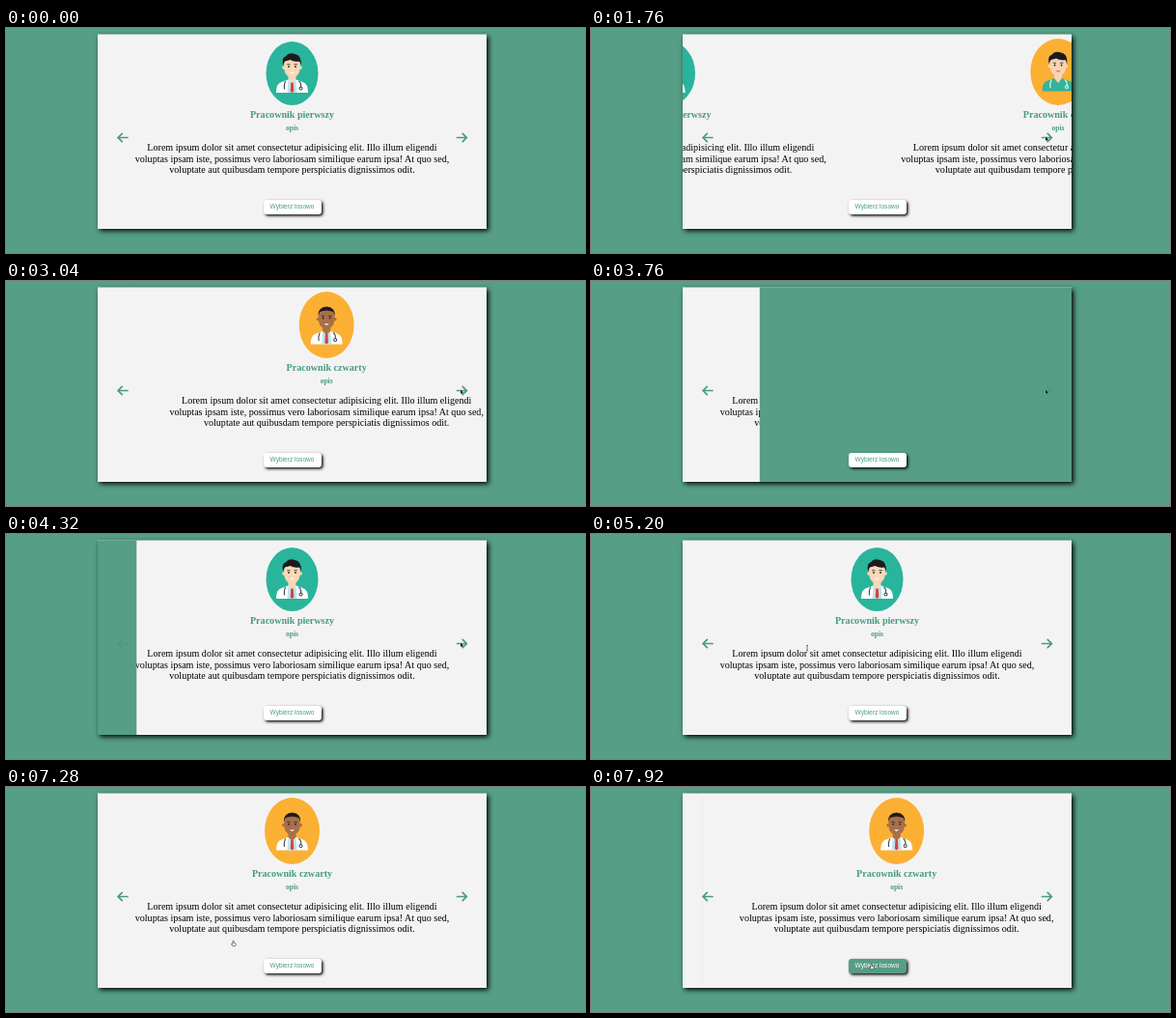
Animation of 600 by 233 pixels, one loop 8000 ms. Source, as an HTML page:

```html
<!DOCTYPE html>
<html lang="pl">
<head>
<meta charset="utf-8">
<title>Slider</title>
<style>
  html, body { margin: 0; width: 100%; height: 100%; overflow: hidden; background: #569e86; }
  svg { display: block; width: 600px; height: 233px; }
  .card, .button { position: absolute; box-sizing: border-box; }
  .card { left: 95px; top: 6.5px; width: 403px; height: 201.5px; box-shadow: 2px 2px 5px #000; }
  svg { position: absolute; left: 0; top: 0; }
  text { text-anchor: middle; font-family: "Liberation Serif", "Times New Roman", serif; }
  .title { font-size: 10.08px; font-weight: bold; fill: #489b7f; }
  .role { font-size: 7.5px; font-weight: bold; fill: #489b7f; }
  .body { font-size: 10.08px; fill: #000; }
  .arrow { fill: none; stroke: #489b7f; stroke-width: 1.7; stroke-linecap: round; stroke-linejoin: round; }
  .button {
    left: 266.5px; top: 178px; width: 60px; height: 14.5px; border-radius: 3px;
    background: #fff; color: #489b7f; box-shadow: 1.5px 1.5px 3px #000;
    font: 6.57px/14.5px "Liberation Sans", Arial, sans-serif; text-align: center; white-space: nowrap;
  }
  .button.hover { background: #569e86; color: #fff; }
</style>
</head>
<body>
<div class="card"></div>
<svg viewBox="0 0 600 233">
  <defs>
    <clipPath id="view"><rect x="95" y="6.5" width="403" height="201.5"/></clipPath>
  </defs>
  <g clip-path="url(#view)">
    <g id="strip"></g>
    <rect id="curtain" y="6" width="403" height="203" fill="#569e86"/>
  </g>
  <path class="arrow" d="M126 113.5H116M120.3 109.3L116 113.5L120.3 117.7"/>
  <path class="arrow" d="M467.5 113.5H477.5M473.2 109.3L477.5 113.5L473.2 117.7"/>
</svg>
<div class="button">Wybierz losowo</div>
<svg viewBox="0 0 600 233">
  <g id="cursor">
    <path id="pointer" d="M0 0V4.6L1.2 3.6L2 5.2L2.8 4.8L2 3.3L3.4 3.2Z" fill="#000" stroke="#ddd" stroke-width=".3"/>
    <path id="beam" d="M-1 -2.6H1M0 -2.6V2.6M-1 2.6H1" fill="none" stroke="#444" stroke-width=".7"/>
    <path id="hand" d="M-1 -2.4Q-.3 -3 .2 -2.3V-.6L2 0Q2.5 .3 2.2 1.6L1.6 2.8H-1L-2.4 .7L-1 .8Z" fill="#fff" stroke="#222" stroke-width=".6"/>
  </g>
</svg>
<script>
const LOOP = 8000, LEFT = 95, WIDTH = 403, MID = 296.5;
const $ = s => document.querySelector(s);

const people = [
  { name: 'pierwszy', back: '#29b59b', rx: 27, ry: 33, cy: 47, skin: '#fbd7b8', coat: '#fff', dy: 1.5, hair: 'quiff' },
  { name: 'drugi', back: '#fbb034', rx: 28.7, ry: 34.5, cy: 45.5, skin: '#f9d3b4', coat: '#35b39a', dy: 0, hair: 'quiff' },
  { name: 'trzeci', back: '#29b59b', rx: 27, ry: 33, cy: 47, skin: '#f9d3b4', coat: '#fff', dy: 1.5, hair: 'short' },
  { name: 'czwarty', back: '#fbb034', rx: 28.5, ry: 34.5, cy: 45.5, skin: '#a87048', coat: '#fff', dy: 0, hair: 'short' }
];
const lines = [
  'Lorem ipsum dolor sit amet consectetur adipisicing elit. Illo illum eligendi',
  'voluptas ipsam iste, possimus vero laboriosam similique earum ipsa! At quo sed,',
  'voluptate aut quibusdam tempore perspiciatis dignissimos odit.'
];
const hairs = {
  quiff: 'M-9.5 37Q-11 29 -7 28Q-3 23 3 25.5Q9.500 26 9.500 37L7.500 33Q2 34 -2 31.500L-7.500 33Z',
  short: 'M-8.700 36Q-9 27 0 26.500Q9 27 8.700 36L7 32Q0 29 -7 32Z'
};

const path = (d, fill, extra = '') => `<path d="${d}" fill="${fill}" ${extra}/>`;
const label = (cls, y, s) => `<text class="${cls}" x="${MID}" y="${y}">${s}</text>`;

function avatar(p) {
  const white = p.coat === '#fff';
  const tube = `stroke="${white ? '#3c4a55' : '#e9f5f2'}" stroke-width="1.1"`;
  return `<ellipse cx="${MID}" cy="${p.cy}" rx="${p.rx}" ry="${p.ry}" fill="${p.back}"/>
    <g transform="translate(${MID} ${p.dy})">
    ${path('M-16.500 65.500Q-16.500 56 -11 54.500L-4 52H4L11 54.500Q16.500 56 16.500 65.500Z', p.coat)}
    ${path('M-4 46H4V52L0 57L-4 52Z', p.skin)}
    ${white ? path('M-4 52L0 56L4 52L5 65.500H-5Z', '#bfe3ee') + path('M-1.300 55H1.300L1.800 64L0 65.500L-1.800 64Z', '#d9443c') : ''}
    <circle cx="-8.600" cy="39.500" r="1.800" fill="${p.skin}"/><circle cx="8.600" cy="39.500" r="1.800" fill="${p.skin}"/>
    ${path('M-8.300 34Q-8.300 29 0 29Q8.300 29 8.300 34V41Q7 49.500 0 49.500Q-7 49.500 -8.300 41Z', p.skin)}
    ${path(hairs[p.hair], '#1d1b1f')}
    <circle cx="-3.500" cy="38.500" r=".9" fill="#222"/><circle cx="3.500" cy="38.500" r=".9" fill="#222"/>
    ${path('M-5.300 36.200H-2M2 36.200H5.300', 'none', 'stroke="#222" stroke-width=".8"')}
    ${path('M-2.500 44.300H2.500Q0 47 -2.500 44.300Z', white ? '#fff' : '#d96a5f')}
    ${path('M-7 53.500Q-9 58 -8 62M7 53.500Q10 56 9 60', 'none', tube)}
    <circle cx="9" cy="61" r="1.500" fill="none" ${tube}/>
    </g>`;
}

$('#strip').innerHTML = people.map((p, i) => `<g transform="translate(${i * WIDTH} 0)">
  <rect x="${LEFT}" y="6" width="${WIDTH + .5}" height="203" fill="#f4f3f4"/>
  ${avatar(p)}
  ${label('title', 92.8, 'Pracownik ' + p.name)}
  ${label('role', 106, 'opis')}
  ${lines.map((s, n) => label('body', 127.2 + n * 11.6, s)).join('')}</g>`).join('');

// CSS "ease": cubic-bezier(.25, .1, .25, 1)
function ease(x) {
  if (x <= 0) return 0;
  if (x >= 1) return 1;
  let lo = 0, hi = 1, s;
  for (let i = 0; i < 24; i++) {
    s = (lo + hi) / 2;
    if (.75 * s * (1 - s) + s ** 3 < x) lo = s; else hi = s;
  }
  return .3 * s * (1 - s) ** 2 + 3 * s * s * (1 - s) + s ** 3;
}

// each click restarts the one-second slide from the current place
const moves = [
  { at: 1450, to: 1 }, { at: 1900, to: 2 }, { at: 2360, to: 3 },
  { at: 3862, to: 0, jump: true }, { at: 6342, to: 3, jump: true }, { at: 7880, to: 1 }
];
function slidePos(t) {
  let pos = 0;
  moves.forEach((m, i) => {
    if (t < m.at) return;
    const end = Math.min(t, moves[i + 1] ? moves[i + 1].at : LOOP);
    pos += (m.to - pos) * (m.jump ? 1 : ease((end - m.at) / 1000));
  });
  return pos;
}

const wipes = [{ at: 3352, dir: -1 }, { at: 5832, dir: 1 }];
function curtainX(t) {
  const w = wipes.find(w => t >= w.at && t < w.at + 1020);
  return w ? LEFT + w.dir * WIDTH * (2 * (t - w.at) / 1020 - 1) : -WIDTH;
}

// time, x, y
const trail = [[960, 471, 112.5], [5000, 471, 112.5], [5200, 224, 118], [5320, 224, 118],
  [5600, 125, 113.5], [6800, 125, 113.5], [7520, 291, 186], [LOOP, 291, 186]];
function cursorAt(t) {
  const i = trail.findIndex(k => k[0] > t);
  const [a, b] = [trail[i - 1], trail[i]];
  const f = (t - a[0]) / (b[0] - a[0]);
  return [a[1] + (b[1] - a[1]) * f, a[2] + (b[2] - a[2]) * f];
}

const show = (id, on) => { $(id).style.display = on ? '' : 'none'; };

function draw(now) {
  const t = now % LOOP;
  $('#strip').setAttribute('transform', `translate(${-slidePos(t) * WIDTH} 0)`);
  $('#curtain').setAttribute('x', curtainX(t));
  $('.button').classList.toggle('hover', t >= 7520);
  show('#cursor', t >= 960);
  if (t >= 960) {
    $('#cursor').setAttribute('transform', `translate(${cursorAt(t)})`);
    show('#pointer', t < 5100);
    show('#beam', t >= 5100 && t < 5500);
    show('#hand', t >= 5500);
  }
}

const start = performance.now();
function tick() {
  draw(performance.now() - start);
  requestAnimationFrame(tick);
}
tick();
</script>
</body>
</html>
```
